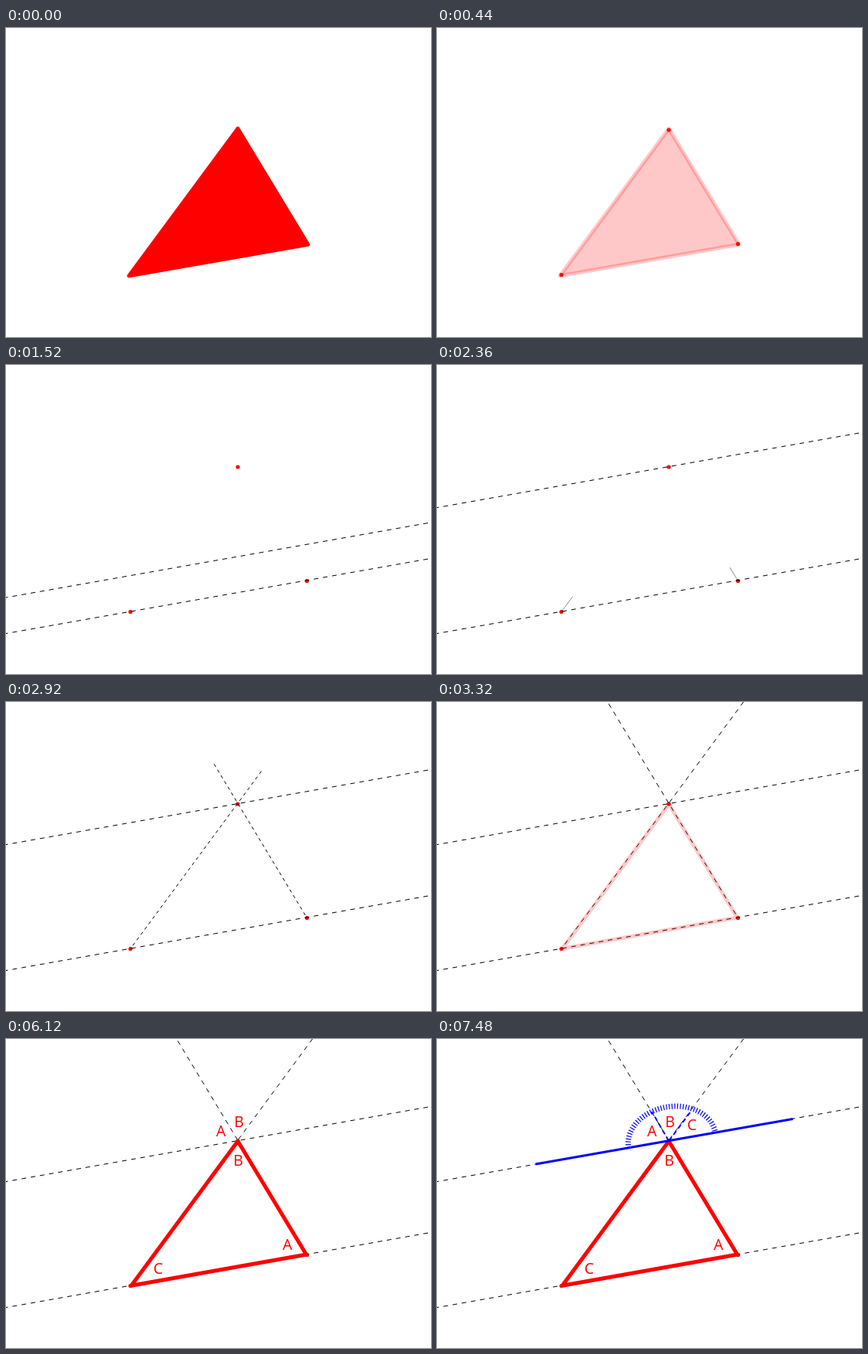
Write an HTML page with a canvas that moves like this. It is 550 px wide and 400 px high and loops after 8 s.

```html
<!DOCTYPE html>
<html lang="en">
<head>
<meta charset="utf-8">
<title>Angles of a triangle</title>
<style>
  html, body { margin: 0; width: 100%; height: 100%; overflow: hidden; background: #fff; }
  canvas { display: block; }
</style>
</head>
<body>
<canvas id="stage" width="550" height="400"></canvas>
<script>
const ctx = document.getElementById("stage").getContext("2d");
const LOOP = 8000, STEP = 40, RED = "#f00", BLUE = "#00f";

const apex = [300, 132], left = [161, 319.5], right = [389.5, 279.5];
const outerTriangle = [[300, 130.2], [159.2, 320.7], [390.8, 280.2]];
const innerTriangle = [[300, 132.3], [162.2, 319.3], [388.6, 279]];
const base = [[546, 251.1], [0, 347.6]];
const leftTip = [396.8, -0.3], rightTip = [222.2, 2.3];
const LIFT = 163;

// letter, centre x, baseline, time of appearance
const labels = [
  ["A", 364.2, 273, 4200], ["A", 278.2, 126, 4600],
  ["B", 300.6, 164, 5080], ["B", 301.6, 114, 5600],
  ["C", 197, 304, 6120], ["C", 330, 118, 6760],
];

const progress = (t, start, end) => Math.min(1, Math.max(0, (t - start) / (end - start)));
const mix = (p, q, k) => p.map((v, i) => v + (q[i] - v) * k);
const growth = k => 0.062 + 0.938 * k;

function line(a, b, color = "#000", width = 1, dash = []) {
  ctx.strokeStyle = color;
  ctx.lineWidth = width;
  ctx.setLineDash(dash);
  ctx.beginPath();
  ctx.moveTo(...a);
  ctx.lineTo(...b);
  ctx.stroke();
}

// Dashes stretch together with the line.
function dashed(a, b, scale = 1) {
  line(a, b, "#000", 1, [6 * scale, 6 * scale]);
}

function triangle(points, alpha, filled) {
  ctx.globalAlpha = alpha;
  ctx.fillStyle = ctx.strokeStyle = RED;
  ctx.lineWidth = 5;
  ctx.setLineDash([]);
  ctx.beginPath();
  points.forEach(p => ctx.lineTo(...p));
  ctx.closePath();
  if (filled) ctx.fill();
  ctx.stroke();
  ctx.globalAlpha = 1;
}

function dot([x, y]) {
  ctx.fillStyle = RED;
  ctx.beginPath();
  ctx.arc(x, y, 2.6, 0, 2 * Math.PI);
  ctx.fill();
}

function parallels(t) {
  if (t >= 800) {
    const s = growth(progress(t, 800, 1120));
    const middle = mix(...base, 0.5);
    dashed(mix(middle, base[0], s), mix(middle, base[1], s), s);
  }
  if (t >= 1280) {
    const lift = LIFT * progress(t, 1280, 2120);
    dashed(...base.map(([x, y]) => [x, y - lift]));
  }
}

function sides(t) {
  if (t < 2360) return;
  const s = growth(progress(t, 2360, 3160));
  dashed(mix(left, leftTip, s), left, s);
  dashed(mix(right, rightTip, s), right, s);
}

function straightAngle(t) {
  ctx.globalAlpha = progress(t, 7000, 7480);
  line(apex, [278, 94], BLUE, 2, [6, 4]);
  line(apex, [329, 93], BLUE, 2, [6, 4]);
  ctx.lineWidth = 7;
  ctx.setLineDash([1.2, 2.4]);
  ctx.beginPath();
  ctx.ellipse(304, 131, 57, 43.5, -0.174, Math.PI, 2 * Math.PI);
  ctx.stroke();
  line([127.5, 162], [460.5, 103.6], BLUE, 3);
  ctx.globalAlpha = 1;
}

function draw(t) {
  ctx.fillStyle = "#fff";
  ctx.fillRect(0, 0, 550, 400);
  triangle(outerTriangle, 1 - progress(t, 0, 560), true);
  [apex, left, right].forEach(dot);
  parallels(t);
  sides(t);
  triangle(innerTriangle, progress(t, 3200, 3760), false);
  if (t > 7000) straightAngle(t);

  ctx.fillStyle = RED;
  for (const [letter, x, y, start] of labels)
    if (t >= start) ctx.fillText(letter, x, y);
}

ctx.lineJoin = "round";
ctx.font = '19.5px "Open Sans", sans-serif';
ctx.textAlign = "center";

const began = performance.now();
function frame() {
  const t = (performance.now() - began) % LOOP;
  draw(Math.floor(t / STEP) * STEP);
  requestAnimationFrame(frame);
}
frame();
</script>
</body>
</html>
```
